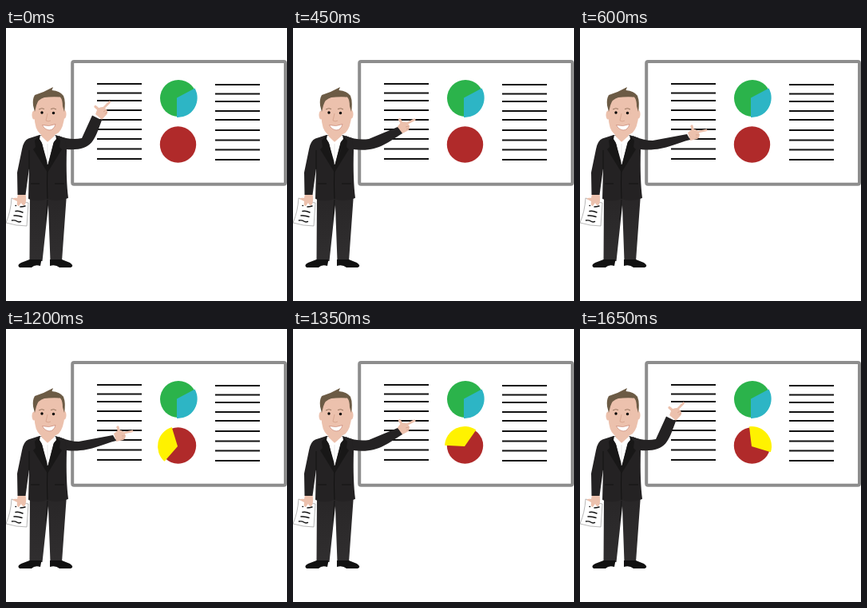
An HTML page that plays this animation: 352x342 px, repeating every 2.1 s.

```html
<!DOCTYPE html>
<html lang="en">
<head>
<meta charset="utf-8">
<title>Presenter at a board</title>
<style>
  html, body { margin: 0; width: 100%; height: 100%; overflow: hidden; background: #fff; }
  svg { display: block; width: 100vw; height: 100vh; }
  .skin { fill: #ecc1ad; }
  .ink { fill: none; stroke: #151515; stroke-width: 1.5; stroke-linecap: round; }
  .finger { fill: none; stroke: #ecc1ad; stroke-linecap: round; }
</style>
</head>
<body>
<svg viewBox="0 0 352 342">
  <defs>
    <linearGradient id="cloth" x2="0" y2="1">
      <stop stop-color="#282627"/><stop offset="1" stop-color="#302e2f"/>
    </linearGradient>
  </defs>

  <!-- Board -->
  <rect x="83.200" y="42" width="266.800" height="153.800" rx="2" fill="#fff" stroke="#8d8d8d" stroke-width="4"/>
  <path id="lines" stroke="#111" stroke-width="2"/>
  <circle cx="216" cy="88" r="23" fill="#2bb34b"/>
  <path d="M214 87.500L236.500 75.500A24.500 24.500 0 0 1 214 112Z" fill="#2db5c5"/>
  <circle cx="215.500" cy="146" r="22.700" fill="#b02a2a"/>
  <path id="slice" fill="#fff200"/>

  <!-- Legs and shoes -->
  <path d="M30 208H76L70 292H55.500L53 222L45.500 292H29.500Z" fill="url(#cloth)"/>
  <path d="M52 215L50 240" stroke="#161616"/>
  <path d="M29.500 290H44.500L43 298Q36 296 32 300H17Q13 297 19 294ZM55 290H70L80 294Q86 298 81 300H67Q62 296 55 298Z" fill="#111"/>

  <!-- Sheet of notes -->
  <path d="M7 213Q17 219 28 219L26 248Q13 248 0 244Q6 230 7 213Z" fill="#fff" stroke="#999" stroke-width=".7"/>
  <path class="ink" d="M12 222.500h.5M18 224q3 0 6-1M12 229.500q4-1 9 1.500M10 235q5-.5 10 1.500M7.500 241q4-.5 6 1t5 .5"/>
  <path class="skin" d="M15 208H24.500Q26 215 24 221Q21 224 19 219L16 223Q13 223 14 217L8 214Q11 212 14 213Z"/>

  <!-- Pointing arm -->
  <g id="hand">
    <path class="finger" stroke-width="2.800" d="M7-5L21-8"/>
    <path class="finger" stroke-width="3.200" d="M5-6L3-13"/>
    <path class="skin" d="M-2-5L4-9.500Q11-9 12-5Q14 0 10 3L1 5Z"/>
    <path d="M8-2h5M8 1h4" stroke="#d09c86" stroke-width=".7"/>
  </g>
  <path id="sleeve" fill="#242223"/>

  <!-- Jacket and shirt -->
  <path d="M42 134L28 138.500Q22 141 20 152L14 181L14.500 209H24.500L29 176L28 214Q39 219 52 214Q64 219 78 213Q75 190 76 153L74 138L62 134Z" fill="#242223"/>
  <path d="M29 153V177M31 195h11M61 195h12M52 174Q51 196 52 214" fill="none" stroke="#121212"/>
  <path d="M43 135L52 174L62 135Z" fill="#fff"/>
  <path d="M42 134L36 141L37 149L34 152L52 181L70 152L67 149L68 141L62 134L52.500 171Z" fill="#181717"/>
  <path class="skin" d="M45 128H61V136L52 143L44 136Z"/>
  <path d="M43 134L52 143L62 134L63 139L57 146L52 143L47 147L42 139Z" fill="#fff"/>
  <path d="M52 145V171" stroke="#ddd" stroke-width=".7"/>

  <!-- Head -->
  <ellipse class="skin" cx="35" cy="109" rx="2.500" ry="5.500"/>
  <ellipse class="skin" cx="73" cy="108" rx="2.500" ry="5.500"/>
  <path class="skin" d="M36 92Q43 84 70 85Q74 93 73.500 109Q72 125 66 131Q54 139 43 133Q36 127 35.500 111Z"/>
  <path d="M36 105L34 97Q33 89 36 84L47 80L59 74L57.500 78Q68 79 72 85Q75 92 73 105L71 98Q71 90 68 86.500Q56 86 48 87Q40 89 38 97Z" fill="#6c5b45"/>
  <path d="M41 102q4-2.500 7-.5M56 101.500q4-2 7 .5" fill="none" stroke="#96745c"/>
  <circle cx="45" cy="106" r="1.700"/>
  <circle cx="59.500" cy="106.500" r="1.700"/>
  <path d="M52 107L50 116Q53 118 56 116" fill="none" stroke="#d5a08a" stroke-width=".8"/>
  <path d="M45.500 121.500Q54 124 62 120.500Q60 128 54 128Q48 127 45.500 121.500Z" fill="#fff" stroke="#c98674" stroke-width=".7"/>
</svg>
<script>
const $ = id => document.getElementById(id);

const rules = (x, rows) => rows.map(y => `M${x} ${y}h56`).join('');
$('lines').setAttribute('d',
  rules(114, [70, 81.5, 91, 103, 115, 127, 139, 151.5, 164]) +
  rules(262, [71, 82.5, 92, 104, 115, 128, 140.5, 152.5, 165]));

// Sleeve: inner elbow, cuff top, cuff bottom, two outer elbow handles; then wrist and hand turn.
const poses = {
  up:     { sleeve: [95, 138, 108, 109.5, 120, 115.5, 110, 143, 107, 154], wrist: [116.5, 111], turn: -33 },
  middle: { sleeve: [98, 138, 124, 116, 132, 123, 114, 144, 108, 156], wrist: [128.5, 118.5], turn: -31 },
  lower:  { sleeve: [95, 139, 131, 124, 137, 132, 117, 144, 106, 156], wrist: [134, 128], turn: -15 },
  low:    { sleeve: [91, 141, 134, 133, 138, 140, 120, 144, 105, 155], wrist: [137, 136], turn: 0 }
};

// Start time, arm pose, slice start and end in clockwise degrees.
const steps = [
  [0, 'up'], [300, 'middle'], [450, 'lower'], [600, 'low'],
  [750, 'low', 80, 202], [1200, 'low', 131, 253], [1350, 'lower', 183, 305],
  [1500, 'middle', 234, 356], [1650, 'up', 263, 377]
];

function slicePath(from, to) {
  const point = deg => {
    const a = deg * Math.PI / 180;
    return `${215 + 25 * Math.cos(a)} ${147 + 25 * Math.sin(a)}`;
  };
  return `M215 147L${point(from)}A25 25 0 0 1 ${point(to)}Z`;
}

function draw() {
  const time = performance.now() % 2100;
  const [, name, from, to] = steps.findLast(step => step[0] <= time);
  const { sleeve: s, wrist, turn } = poses[name];
  $('sleeve').setAttribute('d',
    `M66 135Q80 141 ${s.slice(0, 2)}L${s.slice(2, 6)}C${s.slice(6)} 75 152L66 154Z`);
  $('hand').setAttribute('transform', `translate(${wrist}) rotate(${turn})`);
  $('slice').setAttribute('d', from === undefined ? '' : slicePath(from, to));
  requestAnimationFrame(draw);
}
draw();
</script>
</body>
</html>
```
